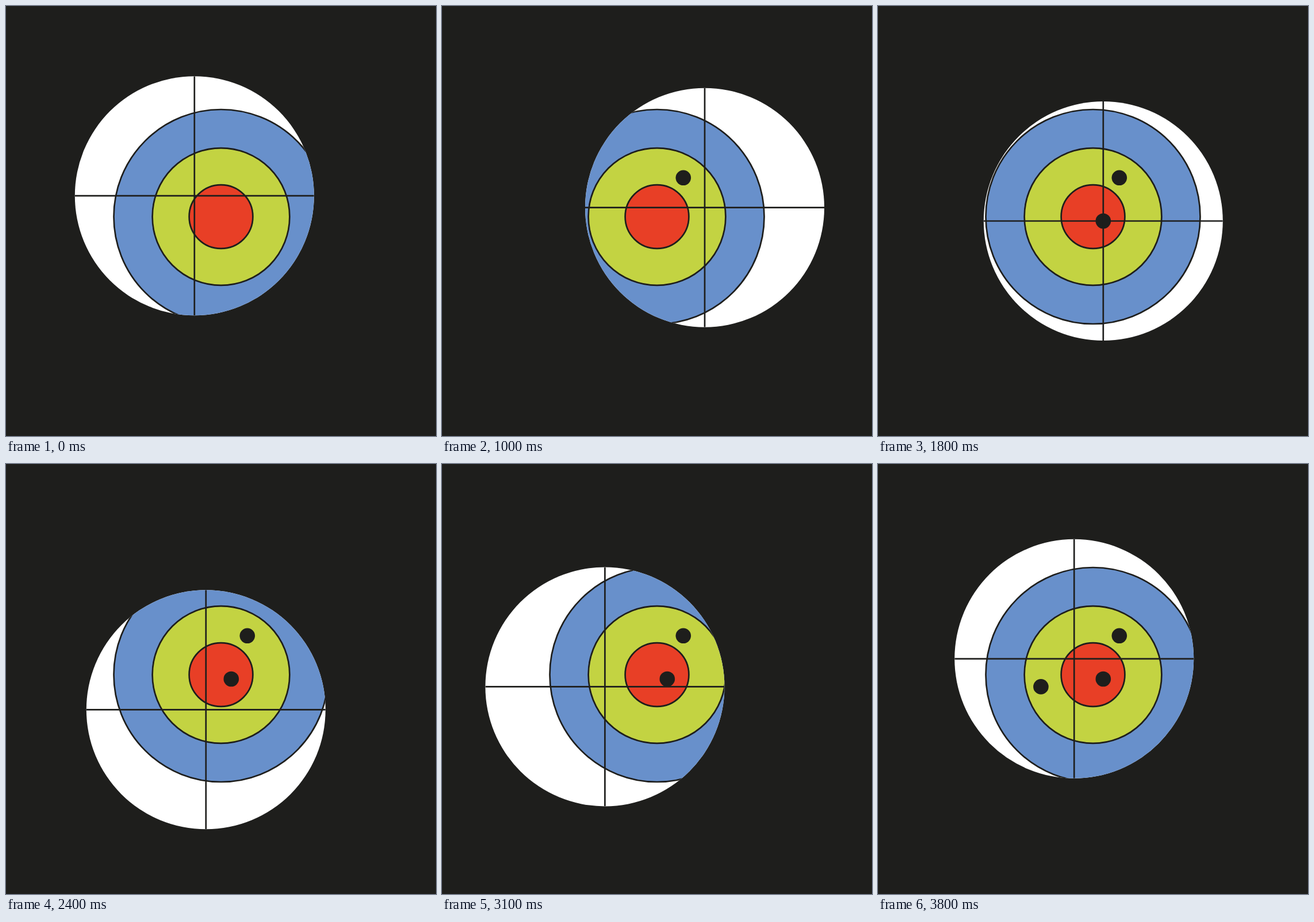
An HTML page that plays this animation: 748x748 px, repeating every 3900 ms.

```html
<!DOCTYPE html>
<html lang="en">
<head>
<meta charset="utf-8">
<title>Target practice</title>
<style>
  html, body { margin: 0; width: 100%; height: 100%; overflow: hidden; background: #1e1e1c; }
  svg { display: block; width: 100vw; height: 100vh; }
  .ring, .cross { stroke: #1e1e1c; stroke-width: 2.7; }
  .shot { fill: #1e1e1c; }
</style>
</head>
<body>
<svg viewBox="0 0 748 748">
  <defs>
    <clipPath id="view"><circle id="lens" r="208"/></clipPath>
  </defs>
  <g clip-path="url(#view)">
    <rect width="748" height="748" fill="#fff"/>
    <g id="target" transform="translate(374 366.5)">
      <circle class="ring" r="186.5" fill="#6890cb"/>
      <circle class="ring" r="119.4" fill="#c3d342"/>
      <circle class="ring" r="55.4" fill="#e83f26"/>
    </g>
    <g id="shots"></g>
    <path id="cross" class="cross" d="M-208 0H208M0-208V208"/>
  </g>
</svg>
<script>
const LOOP = 3900;
const STEP = 100;

// The scope sweeps along one cubic Bézier per leg; a shot lands where the leg ends.
const legs = [
  { from: 100, to: 700, shot: 1000, curve: [[327.8, 330.2], [332, 306], [377.5, 270.5], [419.8, 298.8]] },
  { from: 1000, to: 1600, shot: 1800, curve: [[457, 350.7], [445, 416], [379, 411], [391.8, 374]] },
  { from: 1800, to: 2400, curve: [[391.8, 374], [366, 340], [386, 445], [347.8, 427.3]] },
  { from: 2400, to: 3100, shot: 3300, curve: [[347.8, 427.3], [315, 460], [290, 412], [283.4, 387.4]] },
  { from: 3300, to: 3800, curve: [[283.4, 387.4], [275, 360], [305, 340], [341.2, 338.8]] }
];

const byId = id => document.getElementById(id);
const lens = byId('lens');
const cross = byId('cross');

const mix = (a, b, u) => a.map((v, i) => v + (b[i] - v) * u);

// De Casteljau: blend neighbours until one point is left.
function pointOn(points, u) {
  while (points.length > 1) {
    points = points.slice(1).map((p, i) => mix(points[i], p, u));
  }
  return points[0];
}

function aimAt(t) {
  const { from, to, curve } = legs.findLast(leg => leg.from <= t) ?? legs[0];
  const u = Math.min(1, Math.max(0, (t - from) / (to - from)));
  return pointOn(curve, u);
}

const shots = legs.filter(leg => leg.shot).map(({ shot, curve }) => {
  const dot = document.createElementNS('http://www.w3.org/2000/svg', 'circle');
  const [cx, cy] = curve.at(-1);
  const attrs = { class: 'shot', cx, cy, r: 13.3 };
  for (const name in attrs) dot.setAttribute(name, attrs[name]);
  byId('shots').append(dot);
  return { time: shot, dot };
});

function draw(t) {
  const [x, y] = aimAt(t);
  const move = `translate(${x} ${y})`;
  lens.setAttribute('transform', move);
  cross.setAttribute('transform', move);
  for (const { time, dot } of shots) {
    dot.setAttribute('visibility', t >= time ? 'visible' : 'hidden');
  }
}

const start = performance.now();
function tick() {
  const t = (performance.now() - start) % LOOP;
  draw(Math.floor(t / STEP) * STEP);
  requestAnimationFrame(tick);
}
tick();
</script>
</body>
</html>
```
